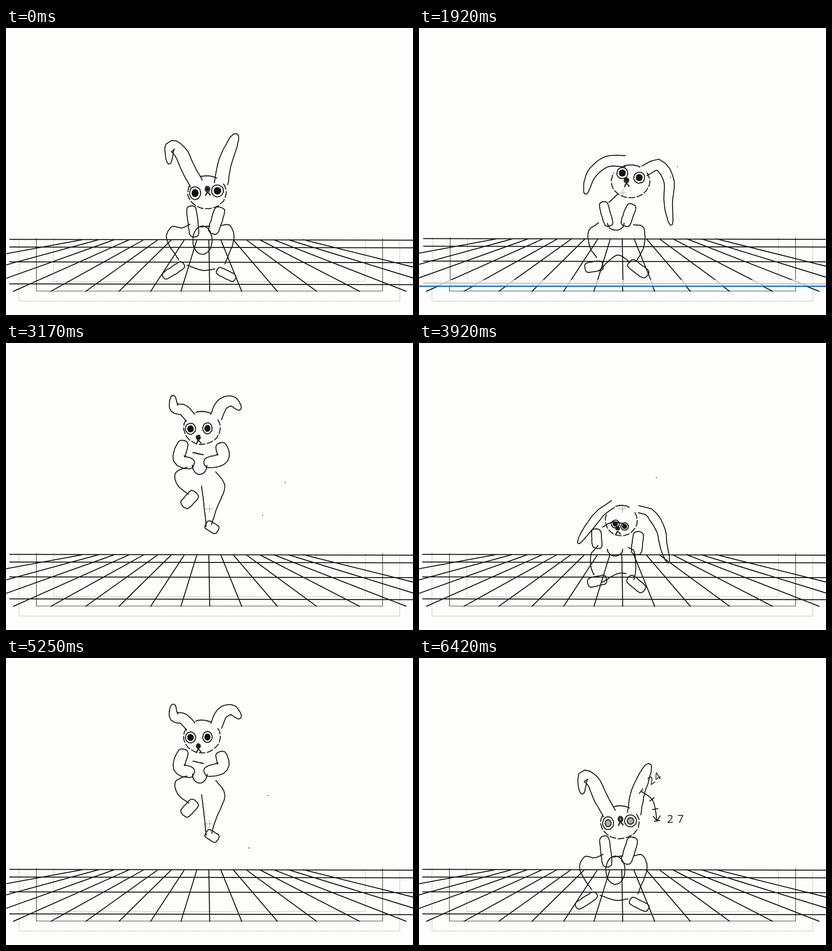
Recreate the animation shown at these times as an HTML page. Size 891 by 629 pixels, loop 6.51 s.

```html
<!DOCTYPE html>
<html lang="en">
<head>
<meta charset="utf-8">
<title>Rabbit hop line test</title>
<style>
  html, body { margin: 0; width: 100%; height: 100%; overflow: hidden; background: #fdfdfb; }
  svg { display: block; width: 891px; height: 629px; fill: none; stroke-linecap: round; stroke-linejoin: round; }
  text { font: 24px "Open Sans", sans-serif; letter-spacing: 9px; fill: #1c1c1c; stroke: none; }
</style>
</head>
<body>
<svg viewBox="0 0 891 629">
  <defs>
    <clipPath id="above"><path d="M0 0H891V565H0z"/></clipPath>
    <clipPath id="below"><path d="M0 565H891V629H0z"/></clipPath>
    <g id="floor">
      <path d="M28.500 461V598.500H862V461M104.500 461V555.500H786.500V461" stroke="#8a8a8a" stroke-dasharray="2 2" stroke-linecap="butt"/>
      <path d="M66.500 461V576.500H824.500V461" stroke="#333" stroke-width="1.200"/>
      <path id="grid" stroke="#0c0c0c" stroke-width="2"/>
      <path d="M437 363.500H453M445.500 355V371" stroke="#888" stroke-dasharray="2 1"/>
    </g>
  </defs>
  <g clip-path="url(#above)"><use id="upper" href="#floor"/></g>
  <g clip-path="url(#below)"><use href="#floor"/></g>
  <path d="M95 610h.1M48 620h.1" stroke="#ccc"/>
  <g id="glitch">
    <path d="M0 552H891V565H0z" fill="#fdfdfb" fill-opacity=".72"/>
    <path d="M0 566H891" stroke="#1873c9" stroke-width="3"/>
  </g>
  <g stroke="#1c1c1c" stroke-width="2.100">
    <g id="rabbit">
      <path id="body"/>
      <path id="fur" stroke-dasharray="13 5"/>
      <path id="pupils" fill="#111"/>
    </g>
    <path id="specks"/>
    <g id="landChart">
      <path/>
      <text x="616" y="338">15</text><text x="611" y="387">16</text><text x="633" y="470">20</text>
    </g>
    <g id="standChart">
      <path/>
      <text x="543" y="361">27</text>
      <text transform="translate(507 279) rotate(-32)" style="letter-spacing:2px">24</text>
    </g>
  </g>
</svg>
<script>
const $ = id => document.getElementById(id);
const LOOP = 6510, FRAMES = 78, CYCLE = 26, SAMPLES = 40;
const SETTLE = [0, .42, .66, .78, .86, 1];

// Ears and limbs: half width, then spine. Rounds: centre, radii. The rest: plain curves.
const rigs = {
  stand: {
    earL: '15 417,341 397,305 382,272 360,259 357,298', earR: '15 471,341 478,300 492,262 505,232',
    head: '440,360 42,36', eyeL: '414,362 12,14', eyeR: '463,357 13,13', nose: '441,353 5,6',
    armL: '11 405,390 413,458', armR: '12 470,393 452,451', belly: '430,465 21,31',
    hipL: '403,430 385,438 362,436 352,464 378,508', hipR: '472,433 490,433 499,463 479,517',
    footL: '9 389,517 344,546', footR: '9 462,530 502,550',
    crotch: '397,520 430,531 457,528', chest: '424,436 446,434'
  },
  crouch: {
    earL: '17 411,426 413,388 414,340 433,311', earR: '16 462,428 485,385 484,343 446,307',
    head: '436,456 43,34', eyeL: '417,466 11,7', eyeR: '457,466 9,6', nose: '438,475 5,5',
    armL: '9 388,484 424,512', armR: '9 470,484 440,513', belly: '430,510 12,11',
    hipL: '365,462 340,450 337,480 355,520', hipR: '490,465 516,452 518,488 505,520',
    footL: '10 354,522 326,534', footR: '10 498,524 526,533',
    crotch: '352,536 388,521 450,533 498,533', chest: '400,432 378,434 363,455'
  },
  air: {
    earL: '12 404,164 388,147 368,142 366,115', earR: '13 460,162 473,135 495,128 513,146',
    head: '429,186 40,36', eyeL: '404,188 11,12', eyeR: '441,187 10,12', nose: '421,207 4,5',
    armL: '13 391,214 379,254 412,266', armR: '13 468,219 474,252 434,264', belly: '424,268 16,20',
    hipL: '396,272 371,285 376,312 400,332', hipR: '459,282 479,315 460,366 450,398',
    footL: '12 416,328 388,358', footR: '10 438,396 464,412',
    crotch: '428,313 434,360 438,402', chest: '409,240 432,245'
  },
  fall: {
    earL: '14 401,203 406,168 393,144 375,127', earR: '11 447,200 446,158 465,136 494,143',
    head: '420,240 41,35', eyeL: '402,243 11,15', eyeR: '437,242 10,13', nose: '419,265 4,5',
    armL: '13 388,266 371,296 411,312', armR: '13 457,266 464,300 431,314', belly: '426,330 13,17',
    hipL: '384,315 369,328 373,355 397,379', hipR: '452,322 472,348 463,403 450,455',
    footL: '12 418,370 384,416', footR: '9 437,464 468,474',
    crotch: '422,365 432,430 437,465', chest: '410,290 433,290'
  },
  squat: {
    earL: '8 391,428 377,475 358,515 329,531', earR: '9 465,428 493,478 518,515 539,543',
    head: '418,454 26,30', eyeL: '411,493 5,4', eyeR: '411,493 4,3', nose: '411,494 3,2',
    armL: '13 370,440 358,470', armR: '13 498,447 506,500', belly: '427,482 15,14',
    hipL: '391,465 381,495 376,515', hipR: '445,470 448,490 464,530',
    footL: '10 420,514 377,527', footR: '10 456,515 484,543',
    crotch: '410,515 435,515 443,495', chest: '384,430 425,415 475,440'
  },
  recover: {
    earL: '12 452,292 410,293 377,322 364,364', earR: '12 494,313 525,300 547,335 546,385 552,432',
    head: '463,336 42,36', eyeL: '445,318 12,12', eyeR: '482,328 12,12', nose: '454,334 5,5',
    armL: '10 402,381 417,434', armR: '11 467,386 450,434', belly: '431,428 18,15',
    hipL: '393,427 371,446 374,480 389,503', hipR: '470,431 492,438 492,480 476,510',
    footL: '11 403,520 363,526', footR: '11 460,513 500,542',
    crotch: '394,532 433,498 462,514', chest: '416,382 434,365'
  }
};

const points = text => text.split(' ').map(p => p.split(',').map(Number));
const lerp = (a, b, k) => a + (b - a) * k;
const mixPoints = (a, b, k) => a.map((p, i) => [lerp(p[0], b[i][0], k), lerp(p[1], b[i][1], k)]);
const line = pts => 'M' + pts.map(([x, y]) => x.toFixed(1) + ' ' + y.toFixed(1)).join('L');
const mapParts = (pose, change) => Object.fromEntries(
  Object.entries(pose).map(([part, value]) => [part, change(value, part)]));
const sample = (at, n = SAMPLES) => Array.from({ length: n + 1 }, (_, i) => at(i / n));

function random(seed) {
  const v = Math.sin(seed * 12.9898) * 43758.5453;
  return v - Math.floor(v);
}

// Catmull-Rom position along a few points.
function along(pts, k) {
  const last = pts.length - 1, u = k * last, i = Math.min(Math.floor(u), last - 1), t = u - i;
  const [a, b, c, d] = [-1, 0, 1, 2].map(o => pts[Math.max(0, Math.min(last, i + o))]);
  return [0, 1].map(n => b[n] + t / 2 * (c[n] - a[n] +
    t * (2 * a[n] - 5 * b[n] + 4 * c[n] - d[n] + t * (3 * (b[n] - c[n]) + d[n] - a[n]))));
}

// Point beside a curve, at a signed distance from it.
function beside(pts, k, distance) {
  const [x, y] = along(pts, k);
  const [x0, y0] = along(pts, Math.max(0, k - .02)), [x1, y1] = along(pts, Math.min(1, k + .02));
  const size = Math.hypot(x1 - x0, y1 - y0) || 1;
  return [x - (y1 - y0) / size * distance, y + (x1 - x0) / size * distance];
}

// Up one side of the spine and down the other; ears stay open at the base.
function outline(spine, half, open) {
  return sample(u => {
    const side = u < .5 ? 1 : -1, v = 1 - Math.abs(2 * u - 1);
    const k = open ? Math.sin(v * Math.PI / 2) : (1 - Math.cos(v * Math.PI)) / 2;
    const taper = Math.sqrt(1 - (open ? k ** 3 : Math.abs(2 * k - 1) ** 5));
    return beside(spine, k, side * half * taper);
  });
}

const arc = ([[x, y], [rx, ry]], from, to) => sample(u => {
  const angle = lerp(from, to, u) * Math.PI / 180;
  return [x + rx * Math.cos(angle), y + ry * Math.sin(angle)];
});

function buildPose(rig, name) {
  const pose = mapParts(rig, (text, part) => {
    if (/ear|arm|foot/.test(part)) {
      const cut = text.indexOf(' ');
      return outline(points(text.slice(cut + 1)), Number(text.slice(0, cut)), part.startsWith('ear'));
    }
    const pts = points(text);
    if (part === 'head') return arc(pts, -30, 210);
    if (part === 'belly') return name === 'stand' ? arc(pts, -90, 270) : arc(pts, 0, 180);
    if (/eye|nose/.test(part)) return arc(pts, 0, 360);
    return sample(u => along(pts, u));
  });
  const [x, y] = points(rig.nose)[0];
  pose.brow = arc(points(rig.head), 250, 300);
  pose.mouth = sample(u => along([[x - 4, y + 14], [x, y + 7], [x + 6, y + 13]], u));
  return pose;
}

const poses = mapParts(rigs, buildPose);
poses.land = mapParts(poses.fall, pts => pts.map(([x, y]) => [x, 119 + (y - 123) * 1.17]));

const steps = [];
const tween = (from, to, mixes, lifts = []) =>
  mixes.forEach((k, i) => steps.push({ from, to, k, lift: lifts[i] || 0 }));
tween('stand', 'crouch', [0, .25, .7]);
tween('crouch', 'air', [0, .06, .2, .45, .7, .9]);
tween('air', 'air', [0, 0, 0, 0], [-14, -22, -14, 0]);
tween('fall', 'fall', [0]);
tween('land', 'squat', SETTLE.slice(0, -1));
tween('squat', 'recover', [0, .2, .55, .85]);
tween('recover', 'stand', [0, .7, 1]);

// Floor lines fan out from the middle, a little wider on the right.
function floorLines() {
  const lines = [];
  for (let n = -9; n <= 7; n++) {
    const m = Math.abs(n), side = Math.sign(n);
    const top = m * (25.5 + .58 * m);
    const bottom = n > 0 ? m * (66 + 4 * m) : m * (61.4 + 1.6 * m) + 210 * (m / 9) ** 10;
    lines.push([[444 + side * top, 464], [446 + side * bottom, 577]]);
  }
  for (let n = 0; n < 4; n++) {
    const y = 464 + n * (8.8 + 7.9 * n);
    lines.push([[8, y - .7], [891, y + 1]]);
  }
  return lines.map(line).join('');
}

// Timing chart: a curve with a tick for each drawing and an arrow at its end.
function chart(pts, ticks) {
  const [x, y] = along(pts, 1);
  return line(sample(u => along(pts, u))) +
    ticks.map(k => line([beside(pts, k, -6), beside(pts, k, 6)])).join('') +
    line([[x - 8, y - 10], [x, y], [x + 7, y - 11]]);
}

// A few stray pencil dots, different on each drawing.
function specks(step) {
  if (step % 25 === 0) return '';
  return [1, 2].map(i => {
    const seed = step * 3 + i;
    return `M${510 + 110 * random(seed)} ${260 + 160 * random(seed + .5)}h.1`;
  }).join('');
}

const rough = (pts, seed) => pts.map(([x, y], i) =>
  [x + random(seed + i) - .5, y + random(seed + i + .5) - .5]);

function shrink(pts, k) {
  const centre = [0, 1].map(n => (pts[0][n] + pts[SAMPLES / 2][n]) / 2);
  return pts.map(p => p.map((v, n) => lerp(centre[n], v, k)));
}

function show(step) {
  const { from, to, k, lift } = steps[step];
  const pose = mapParts(poses[from], (pts, part) => rough(mixPoints(pts, poses[to][part], k), step * 50));
  const { head, ...strokes } = pose;
  const eyes = [pose.eyeL, pose.eyeR, pose.nose];
  const shifted = step === 23 || step === 24;
  const visible = (id, on) => $(id).setAttribute('visibility', on ? 'visible' : 'hidden');
  $('rabbit').setAttribute('transform', `translate(0 ${lift})`);
  $('body').setAttribute('d', Object.values(strokes).map(line).join(''));
  $('fur').setAttribute('d', line(head));
  $('pupils').setAttribute('d', eyes.map(pts => line(shrink(pts, .55))).join(''));
  $('pupils').setAttribute('fill-opacity', step === 25 ? .35 : 1);
  $('specks').setAttribute('d', specks(step));
  $('upper').setAttribute('transform', shifted ? 'translate(2 -1.8) scale(.9975 1)' : '');
  visible('glitch', shifted);
  visible('landChart', step === 19);
  visible('standChart', step === 25);
}

// Twelve drawings a second, on 10 ms boundaries.
function frameAt(time) {
  let n = FRAMES - 1;
  while (Math.round(n * 25 / 3) * 10 > time) n--;
  return n;
}

$('grid').setAttribute('d', floorLines());
$('landChart').firstElementChild.setAttribute('d', chart([[598, 332], [603, 460]], SETTLE));
$('standChart').firstElementChild.setAttribute('d', chart([[486, 292], [512, 313], [521, 357]], [0, .45, .7, 1]));

const start = performance.now();
let shown = -1;
function tick() {
  const step = frameAt((performance.now() - start) % LOOP) % CYCLE;
  if (step !== shown) show(shown = step);
  requestAnimationFrame(tick);
}
tick();
</script>
</body>
</html>
```
